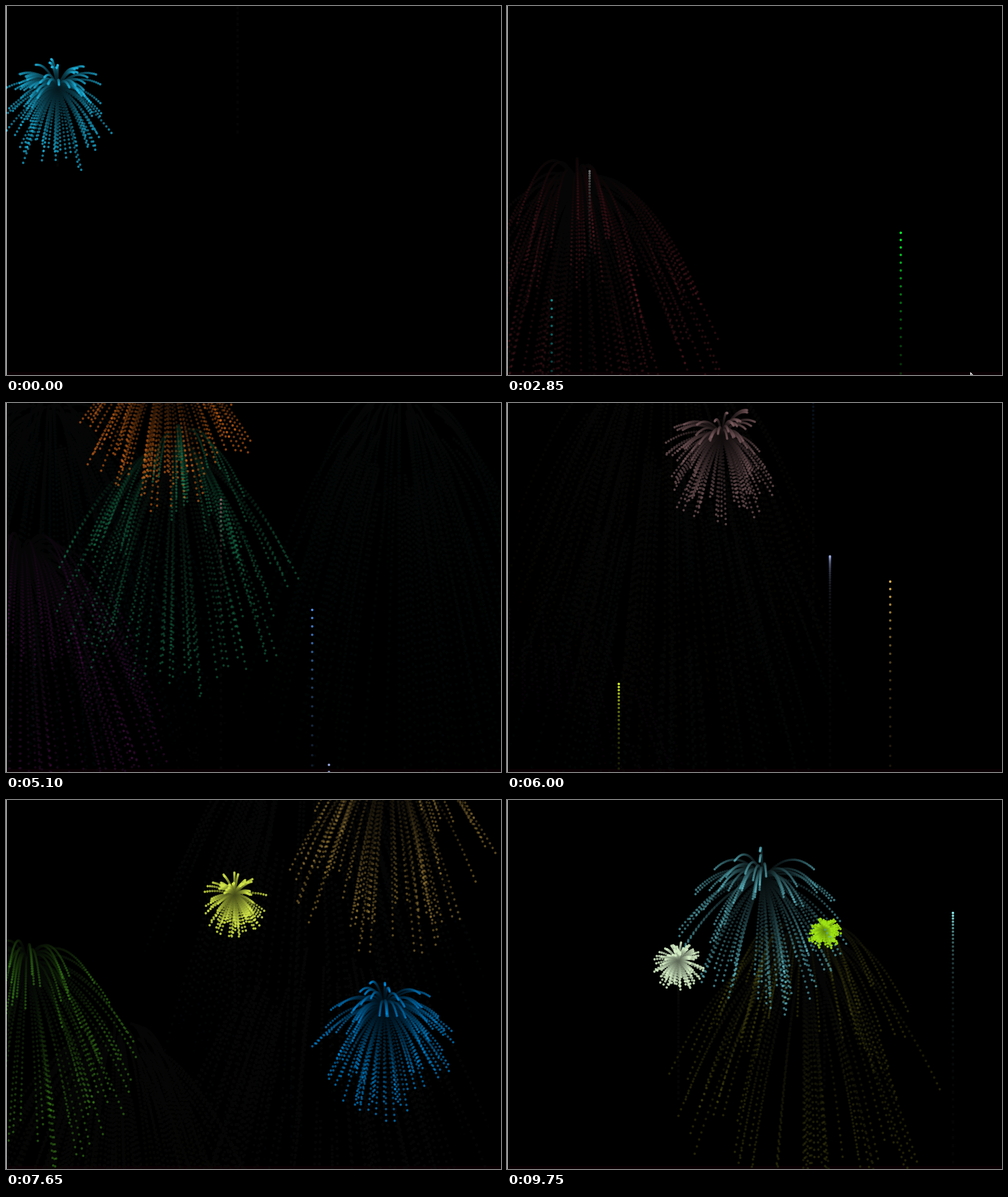
Animation, 797 px wide and 593 px high, one loop 9.85 s. Source, as an HTML page with a canvas:

```html
<!DOCTYPE html>
<html lang="en">
<head>
<meta charset="utf-8">
<title>Fireworks</title>
<style>
  html, body { margin: 0; width: 100%; height: 100%; overflow: hidden; background: #000; }
  canvas { display: block; }
</style>
</head>
<body>
<canvas id="stage" width="797" height="593"></canvas>
<script>
const W = 797, H = 593;
const LOOP = 9850, STEP = 150, TICKS_PER_STEP = 9;
const GRAVITY = 0.2, SPARKS = 100, DOT = 2, TRAIL = 56;
const ctx = document.getElementById('stage').getContext('2d');

// x, apex y, tick of the burst, colour
const shows = [
  [83, 133, -21, '#1ebeeb'],
  [373, -182, 6, '#b4b4c8'],
  [112, 290, 119, '#d23c50'],
  [133, 233, 189, '#6e6e6e'],
  [634, 28, 229, '#0aff32'],
  [72, 24, 238, '#0a8c8c'],
  [25, 253, 252, '#be28be'],
  [273, 83, 261, '#28d28c'],
  [258, -66, 274, '#ff7d1e'],
  [346, 53, 338, '#826064'],
  [520, 245, 364, '#96a5dc'],
  [493, -90, 371, '#4b91eb'],
  [180, 394, 384, '#d7f52d'],
  [34, 265, 419, '#5ac828'],
  [617, -73, 420, '#e1b450'],
  [609, 335, 433, '#0096f0'],
  [368, 153, 447, '#d7eb4b'],
  [478, 235, 536, '#969623'],
  [412, 127, 555, '#6edceb'],
  [276, 259, 576, '#d7f0c8'],
  [511, 210, 579, '#a0e614'],
  [718, 133, 607, '#8cebeb']
].map(([x, apex, burst, color], i) => ({ x, apex, burst, color, sparks: makeSparks(i + 7) }));

// time in ms, x, y of the pointer
const pointer = [
  [900, 730, 549], [1050, 719, 430], [1500, 735, 480],
  [1950, 750, 560], [2250, 746, 589], [3300, 746, 589]
];

function seeded(seed) {
  let s = seed * 7919;
  return () => {
    s = (s + 0x6D2B79F5) | 0;
    let t = Math.imul(s ^ (s >>> 15), 1 | s);
    t = (t + Math.imul(t ^ (t >>> 7), 61 | t)) ^ t;
    return ((t ^ (t >>> 14)) >>> 0) / 4294967296;
  };
}

function makeSparks(seed) {
  const rnd = seeded(seed);
  return Array.from({ length: SPARKS }, () => {
    const angle = rnd() * Math.PI * 2, speed = 2 + rnd() * 2.5;
    return [Math.cos(angle) * speed, Math.sin(angle) * speed];
  });
}

function addDot(x, y) {
  if (x < -DOT || x > W + DOT || y < -DOT || y > H + DOT) return;
  ctx.moveTo(x + DOT, y);
  ctx.arc(x, y, DOT, 0, Math.PI * 2);
}

function drawShow(show, tick) {
  const age = tick - show.burst;
  const life = 1 - Math.max(age, 0) * 4 / 255;
  if (life <= 0) return;
  const drop = show.apex + GRAVITY / 2 * age * age;
  if (age < 0 && drop > H + DOT) return;
  ctx.globalAlpha = life;
  ctx.fillStyle = show.color;
  ctx.beginPath();
  if (age < 0) addDot(show.x, drop);
  else for (const [vx, vy] of show.sparks) addDot(show.x + vx * age, drop + vy * age);
  ctx.fill();
}

function fade(alpha) {
  ctx.globalAlpha = alpha;
  ctx.fillStyle = '#000';
  ctx.fillRect(0, 0, W, H);
}

function drawPointer(ms) {
  const i = pointer.findIndex(p => p[0] > ms);
  if (i < 1) return;
  const [t0, x0, y0] = pointer[i - 1], [t1, x1, y1] = pointer[i];
  const f = (ms - t0) / (t1 - t0);
  ctx.save();
  ctx.translate(Math.round(x0 + (x1 - x0) * f) + 0.5, Math.round(y0 + (y1 - y0) * f) + 0.5);
  ctx.fillStyle = '#000';
  ctx.strokeStyle = '#fff';
  ctx.lineWidth = 1.2;
  const arrow = new Path2D('M0 0V14L3 11L5.5 16.5L8 15.5L5.7 10.2H9.6Z');
  ctx.fill(arrow);
  ctx.stroke(arrow);
  ctx.restore();
}

function drawEdges() {
  ctx.globalAlpha = 1;
  ctx.globalCompositeOperation = 'lighten';
  ctx.fillStyle = '#0a0004';
  ctx.fillRect(0, 588, W, 5);
  ctx.globalCompositeOperation = 'source-over';
  ctx.fillStyle = '#fff';
  ctx.fillRect(0, 0, 1, H);
}

function render(step) {
  const now = step * TICKS_PER_STEP;
  fade(1);
  for (let tick = now - TRAIL; tick <= now; tick++) {
    fade(25 / 255);
    for (const show of shows) drawShow(show, tick);
  }
  drawEdges();
  drawPointer(step * STEP);
}

const start = performance.now();
let shown = -1;
function loop() {
  const step = Math.floor(((performance.now() - start) % LOOP) / STEP);
  if (step !== shown) render(shown = step);
  requestAnimationFrame(loop);
}
loop();
</script>
</body>
</html>
```
